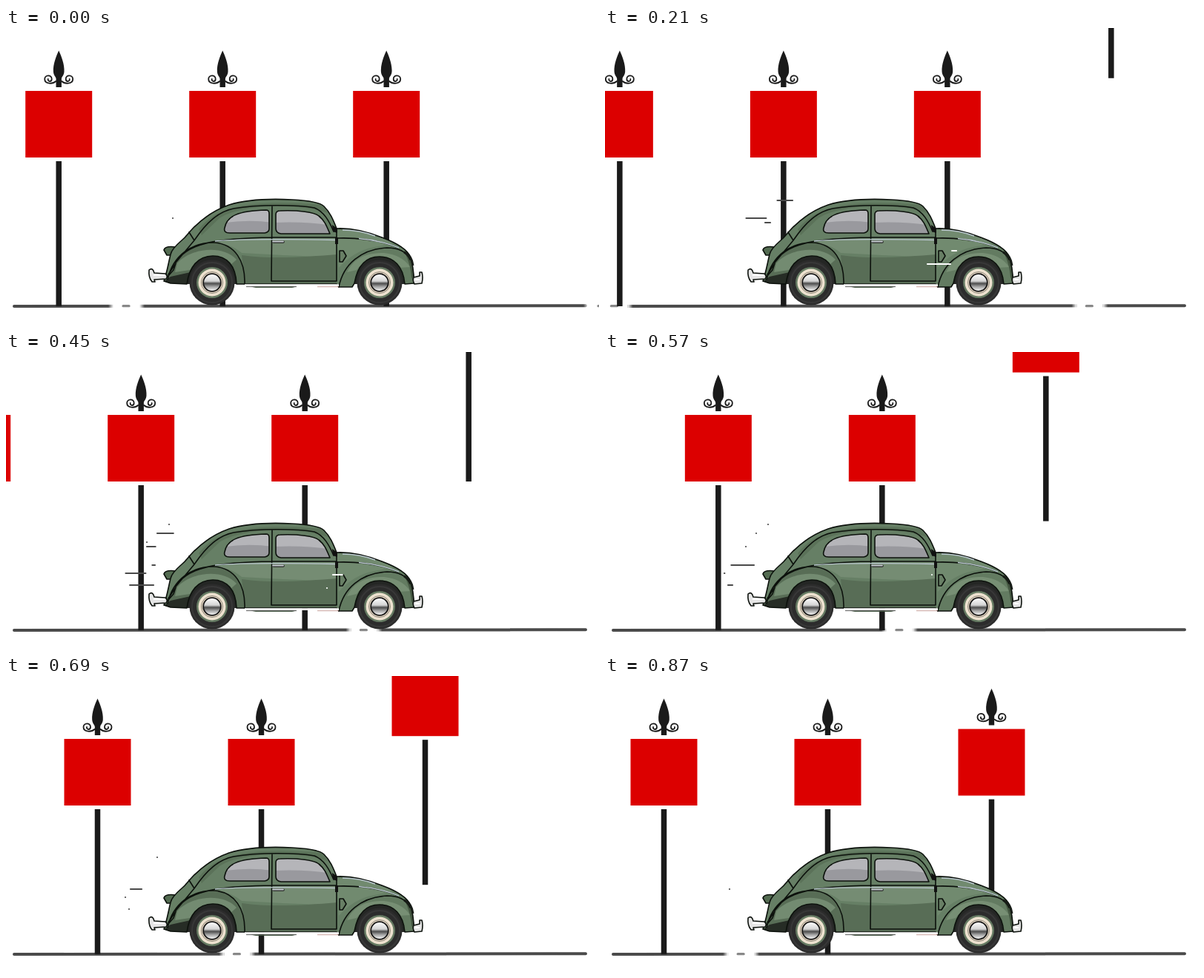
Animation of 800x400 px, one loop 0.9 s. Source, as an HTML page:

```html
<!DOCTYPE html>
<html lang="en">
<head>
<meta charset="utf-8">
<title>Car on the road</title>
<style>
html, body { margin: 0; width: 100%; height: 100%; overflow: hidden; background: #fff; }
svg { display: block; width: 800px; height: 400px; }
.ink { fill: none; stroke: #0c110c; stroke-width: 1.6; stroke-linecap: round; stroke-linejoin: round; }
.edge { stroke: #0c110c; stroke-width: 1.6; stroke-linejoin: round; }
</style>
</head>
<body>
<svg viewBox="0 0 800 400">
  <defs>
    <linearGradient id="fadeIn">
      <stop offset="0" stop-color="#fff" stop-opacity="0"/>
      <stop offset="1" stop-color="#fff"/>
    </linearGradient>
    <linearGradient id="fadeOut">
      <stop offset="0" stop-color="#fff"/>
      <stop offset="1" stop-color="#fff" stop-opacity="0"/>
    </linearGradient>
    <linearGradient id="chrome" x2="0" y2="1">
      <stop offset="0" stop-color="#fff"/>
      <stop offset=".42" stop-color="#d4d4d4"/>
      <stop offset=".55" stop-color="#4c4c4c"/>
      <stop offset=".75" stop-color="#aaa"/>
      <stop offset="1" stop-color="#fff"/>
    </linearGradient>
    <g id="gap">
      <rect x="-5" y="370" width="7" height="11" fill="url(#fadeIn)"/>
      <rect x="2" y="370" width="35" height="11" fill="#fff"/>
      <rect x="37" y="370" width="7" height="11" fill="url(#fadeOut)"/>
      <path d="M15 375.7H23" stroke="#888" stroke-width="3.2" stroke-linecap="round"/>
    </g>
    <path id="curl" d="M4 72C8 76 19 76 19 69C19 63 9.500 62.500 9.500 69C9.500 73 15 73 14.500 69" fill="none" stroke="#1a1a1a" stroke-width="1.8" stroke-linecap="round"/>
    <g id="post">
      <path d="M0 30.500C3 37 8 49 7.300 59C7 64 4 66 3.700 68V80H-3.700V68C-4 66 -7 64 -7.300 59C-8 49 -3 37 0 30.500Z" fill="#1a1a1a"/>
      <use href="#curl"/>
      <use href="#curl" transform="scale(-1 1)"/>
      <rect x="-45" y="85" width="90" height="90" fill="#dc0000"/>
      <rect x="-3.750" y="180" width="7.500" height="196" fill="#1a1a1a"/>
    </g>
    <g id="wheel">
      <circle r="30.500" fill="#2c2c2c"/>
      <circle r="27" fill="none" stroke="#383838" stroke-width="2"/>
      <circle r="21" fill="#667b63"/>
      <circle r="18.500" fill="#eee2d0"/>
      <circle r="14.500" fill="#e3d5c2" stroke="#777166" stroke-width=".8"/>
      <circle r="11.800" fill="url(#chrome)" stroke="#171717" stroke-width="1.800"/>
    </g>
    <path id="shell" d="M213 342C217 331 219 318 222 306C223 300 229 294 237 287C243 282 246 277 250 273C265 257 281 246 301 239C327 231 357 230.500 386 232C407 233 423 235 429 241C437 249 441 258 446 271C466 270 489 276 507 283C526 290 541 298 546 310C549 320 550 331 551 345L538 346C536 322 523 309 504 309C485 309 474 322 470 345L467 350H449L446 346H322L311 346C310 321 298 308 279 308C259 308 247 323 244 346L222 345Z"/>
    <clipPath id="bodyClip"><use href="#shell"/></clipPath>
    <path id="glass" d="M295 270C298 254 313 247 351 246Q355 246 355 251V271Q355 276 349 277H302Q293 277 295 270ZM364 252Q364 247 370 247C395 246 416 249 422 254C430 260 433 269 437 278H371Q364 277 364 271Z"/>
    <clipPath id="glassClip"><use href="#glass"/></clipPath>
  </defs>

  <path d="M11 376L782 375.300" stroke="#4a4a4a" stroke-width="4" stroke-linecap="round"/>
  <g id="gaps"></g>
  <g id="posts"></g>

  <g id="car">
    <!-- wheel wells and underside -->
    <path d="M241 346C244 319 257 305 279 305C300 305 313 320 314 346ZM468 346C471 319 486 306 504 306C525 306 538 322 540 346Z" fill="#242624"/>
    <path d="M330 349.500H392L386 351H337Z" fill="#4f634d"/>

    <!-- rear lamp, body -->
    <path class="edge" d="M229 296C221 295 214 296 213 300L217 307H226Z" fill="#536b51"/>
    <use href="#shell" fill="#667f65"/>
    <g clip-path="url(#bodyClip)">
      <path d="M260 272C285 239 335 231 427 239L434 250C400 237 320 236 288 257L264 280Z" fill="#5b7259"/>
      <path d="M232 312C260 290 300 285 360 284H446V308C410 310 365 306 318 304C293 283 258 288 232 312Z" fill="#758c73"/>
      <path d="M318 307C360 313 410 309 446 306V347H322Z" fill="#586d56"/>
      <path d="M446 273C475 272 505 280 522 291L497 296C478 299 461 310 449 324Z" fill="#718a6f"/>
      <path d="M449 350C456 316 481 298 517 297C540 298 549 322 551 346Z" fill="#637b61"/>
      <path d="M460 330C470 310 486 304 510 304C527 306 538 312 545 323L530 324C520 310 488 306 473 327Z" fill="#778f74"/>
      <path d="M217 341C226 307 253 288 281 290C308 292 323 315 322 347H308C307 320 297 311 279 311C258 311 248 326 245 347Z" fill="#586d56"/>
      <path d="M231 318C248 298 292 292 311 313L302 321C287 306 260 311 248 327L228 330Z" fill="#738b71"/>
      <path d="M536 302C542 309 546 323 547 337L551 345V303Z" fill="#435540"/>
      <path d="M212 343L222 336L249 330V348H212Z" fill="#262c25"/>
    </g>
    <use href="#shell" class="ink"/>

    <!-- windows -->
    <use href="#glass" fill="#b5b5b9"/>
    <path clip-path="url(#glassClip)" d="M290 264Q325 258 360 263Q405 261 440 267V280H290Z" fill="#99999e"/>
    <use href="#glass" class="ink"/>

    <!-- panel seams -->
    <path class="ink" d="M247 276L254 287L229 317M254 287C271 262 287 248 307 244C340 238 394 239 416 243C429 248 436 261 442 275M232 312C249 292 279 284 359 283H446M359 241L358 342H446V271M446 284C475 283 505 287 529 297M218 340C225 307 252 289 281 290C309 292 323 315 322 346M449 350C455 319 479 299 514 297C531 297 541 304 545 313M219 333L229 318L226 327L218 336"/>
    <path d="M282 288C310 285.500 370 285 445 286.500M454 273C470 273 485 276 498 281M476 284.500C497 286 515 291 530 297" fill="none" stroke="#b8c5cc" stroke-width="1.400"/>
    <path d="M440 266L447 271V277L441 275ZM444 283H448V292H444Z" fill="#111"/>
    <path class="edge" d="M450 301H455L459 308L454 316H450Z" fill="#687f65"/>
    <path d="M361 289H374" stroke="#222" stroke-width="3.600" stroke-linecap="round"/>
    <path d="M360 288.500H374" stroke="#c5ccd0" stroke-width="1.800" stroke-linecap="round"/>
    <path d="M537 303C544 306 548 313 549 321" fill="none" stroke="#171c17" stroke-width="3"/>

    <!-- sill -->
    <path d="M322 347.700H449" stroke="#fff" stroke-width="2.800"/>
    <path d="M324 349.600H392" stroke="#333" stroke-width=".8"/>
    <path d="M420 349.700H449" stroke="#a6655c" stroke-width=".6"/>

    <use href="#wheel" x="278" y="344"/>
    <use href="#wheel" x="504" y="344"/>

    <!-- bumpers -->
    <path class="edge" d="M193 327Q198 323 200 331L215 332Q219 335 216 339L200 340L201 343H197Q192 337 193 327Z" fill="#e5e5e5"/>
    <path d="M199 334H214" stroke="#fff" stroke-width="2"/>
    <path class="edge" d="M550 337L558 335V330H561Q563 337 561 345L551 346Q548 341 550 337Z" fill="#e5e5e5"/>
    <path d="M552 340H558" stroke="#fff" stroke-width="2"/>
  </g>
  <g id="streaks" stroke-width="2.200" stroke-linecap="round"></g>
</svg>
<script>
const LOOP = 900, STEP = 30;
const SPACING = 221, POST_SPEED = 0.2445, DROP_SPEED = 0.4467;
const GAP_SPEED = 0.7125, GAP_PERIOD = 641;
const DARK = "#4a4a4a", LIGHT = "#fff";

// right end, height, start time, colour
const STREAKS = [
  [224, 257, 0, DARK], [467, 319, 60, LIGHT], [254, 233, 110, DARK],
  [224, 263, 170, DARK], [475, 301, 175, LIGHT], [238, 245, 215, DARK],
  [195, 299, 240, DARK], [200, 315, 265, DARK], [202, 288, 425, DARK]
];

const byId = id => document.getElementById(id);

function add(parent, tag, attrs) {
  const el = document.createElementNS("http://www.w3.org/2000/svg", tag);
  for (const key in attrs) el.setAttribute(key, attrs[key]);
  return byId(parent).appendChild(el);
}

const posts = [0, 1, 2, 3].map(() => add("posts", "use", { href: "#post" }));
const gaps = [0, 1].map(() => add("gaps", "use", { href: "#gap" }));
const streaks = STREAKS.map(([, , , stroke]) => add("streaks", "path", { stroke, fill: "none" }));

const move = (el, x, y) => el.setAttribute("transform", `translate(${x} ${y})`);

// The left end runs out first, then the right end catches up.
function streakPath([right, y, start], t) {
  const age = t - start;
  if (age < 0 || age > 485) return "";
  const reach = Math.min(age * 0.225, 33) + Math.min(2, Math.max(0, age - 150) * 0.025);
  const tail = Math.max(0, age - 185) * 0.225;
  const x1 = right - reach + 1;
  const x2 = Math.max(x1 + 0.01, right - tail - 1);
  return `M${x1} ${y}H${x2}`;
}

function draw(t) {
  posts.forEach((el, i) => {
    const y = i === 3 ? -DROP_SPEED * (LOOP - t) : 0;
    move(el, 71.2 + i * SPACING - POST_SPEED * t, y);
  });
  gaps.forEach((el, i) => move(el, 784 - i * GAP_PERIOD - GAP_SPEED * t, 0));
  streaks.forEach((el, i) => el.setAttribute("d", streakPath(STREAKS[i], t)));
}

const origin = performance.now();

function tick() {
  const t = (performance.now() - origin) % LOOP;
  draw(Math.floor(t / STEP) * STEP);
  requestAnimationFrame(tick);
}

draw(0);
requestAnimationFrame(tick);
</script>
</body>
</html>
```
